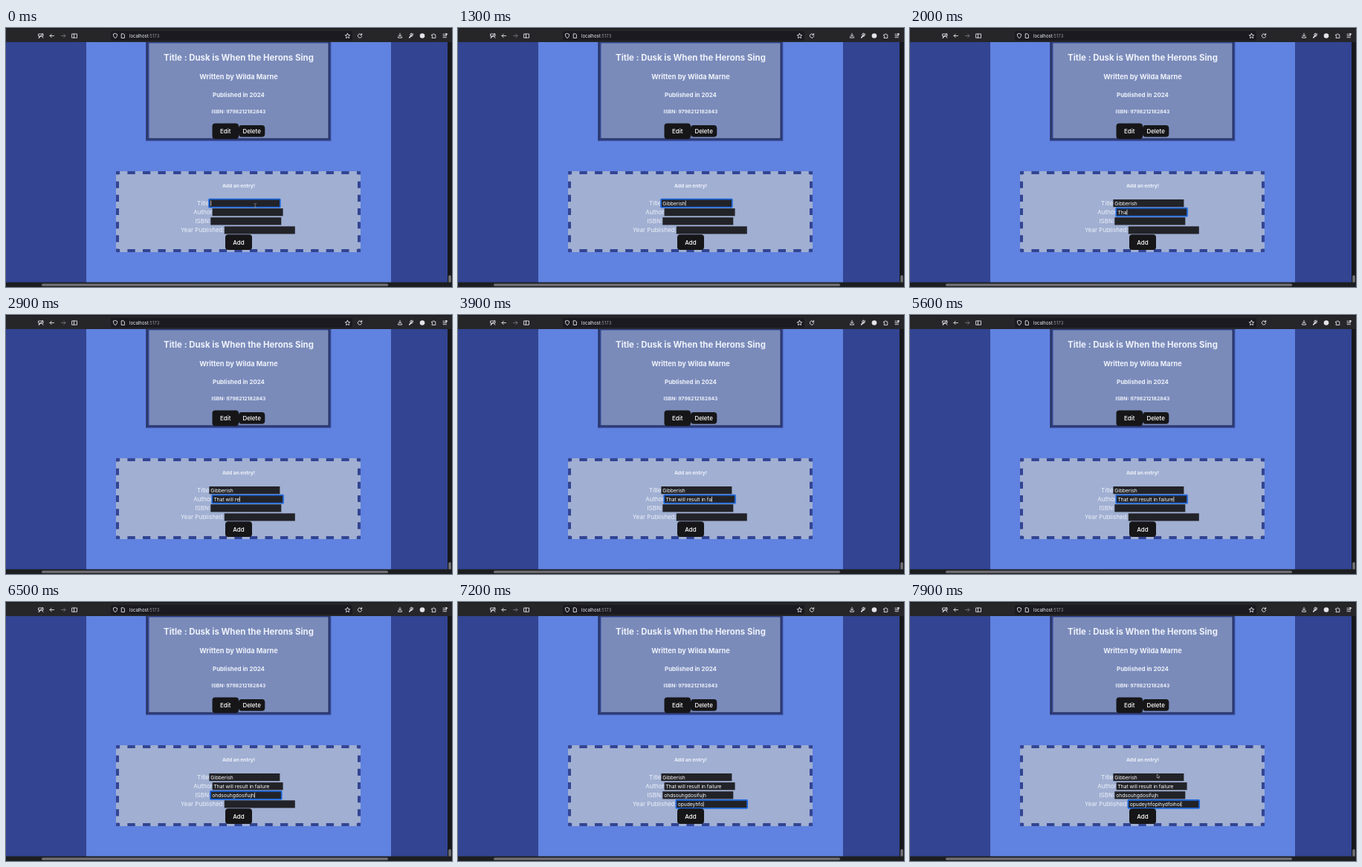
An HTML page for the animation above (8000 ms loop, 600 by 349 pixels).

```html
<!DOCTYPE html>
<html lang="en">
<head>
<meta charset="utf-8">
<title>Add an entry</title>
<style>
html, body { margin: 0; width: 100%; height: 100%; overflow: hidden; background: #16181b; }
svg { display: block; width: 100vw; height: 100vh; }
text { font-family: Inter, Roboto, "Open Sans", sans-serif; fill: #eef1fa; white-space: pre; }
.mid { text-anchor: middle; }
.head { font-weight: 700; }
.label { font-size: 8px; text-anchor: end; }
.btn { font-size: 8px; font-weight: 500; fill: #fff; }
.value { font-size: 6.7px; fill: #fff; }
.icon { fill: none; stroke: #e4e4e8; stroke-width: .9; stroke-linecap: round; stroke-linejoin: round; }
.solid { fill: #e4e4e8; }
</style>
</head>
<body>
<svg id="stage" viewBox="0 0 600 349">
  <rect width="600" height="349" fill="#324492"/>
  <rect x="108" y="19" width="410" height="325" fill="#6082e0"/>

  <!-- book card with a grooved border -->
  <path d="M188.500 17V152.300H437.300V17z" fill="#34468f"/>
  <path d="M188.500 17V152.300L190.500 150.300V17z" fill="#25305f"/>
  <path d="M192.500 148.500L190.500 150.300H435.300V17H433.500V148.500z" fill="#25305f"/>
  <rect x="192.5" y="20.5" width="241" height="128" fill="#7a8bba"/>
  <g class="mid head">
    <text x="313" y="44" font-size="11.45">Title : Dusk is When the Herons Sing</text>
    <text x="313" y="69.4" font-size="9.2">Written by Wilda Marne</text>
    <text x="313" y="92.8" font-size="7.95">Published in 2024</text>
    <text x="313" y="114.6" font-size="6.75">ISBN: 9798212182843</text>
  </g>

  <!-- entry form -->
  <rect x="148" y="193" width="329" height="109" fill="#a0afd2"/>
  <g id="dashes" stroke="#324492" stroke-width="4" fill="none"></g>
  <text class="mid head" x="313" y="215.4" font-size="6.7">Add an entry!</text>
  <g id="fields"></g>
  <g id="buttons"></g>

  <!-- browser toolbar -->
  <rect width="600" height="19" fill="#262629"/>
  <rect width="600" height="1" fill="#19191c"/>
  <rect x="141" y="4" width="325" height="13" rx="2" fill="#1b1a20"/>
  <g class="icon">
    <path d="M44 8h6v3h-6zM45.500 11l-1.500 2.500M48 11l2 2.500M44.500 13.500l5-6"/>
    <path d="M64.500 10.500h-5.500m2.300-2.300l-2.300 2.300 2.300 2.300"/>
    <path d="M74.500 10.500h5.500m-2.300-2.300l2.300 2.300-2.300 2.300" stroke="#77777d"/>
    <path d="M89 8h6.500v5.200h-6.500zM91.500 8v5.200"/>
    <path d="M147 7.500l2.600 1c0 2.800-.8 4.200-2.600 5.200-1.800-1-2.600-2.400-2.600-5.200z"/>
    <path d="M155.600 7.800h2.600l1.200 1.200v4.500h-3.800z"/>
    <path d="M459.500 7.300l1 2.100 2.200.3-1.600 1.600.4 2.300-2-1.100-2 1.100.4-2.300-1.600-1.600 2.200-.3z"/>
    <path d="M478.300 9a2.700 2.700 0 1 0 .4 2.200M478.700 7.500v2h-2"/>
    <path d="M530 7.300v4m-1.800-1.700l1.800 1.700 1.800-1.700M527.500 11.700v1.500h5v-1.500"/>
    <path d="M542.700 12.900l3-3" stroke-width="1.500"/>
    <path d="M547.300 8.100l-1.200 1.200-1-.9 1-1.200a2 2 0 1 0 1.200.9z"/>
    <path d="M573 9h1.300a1.100 1.100 0 1 1 2.200 0h1.300v4.500h-4.800v-1.200a1 1 0 1 0 0-2z"/>
    <path d="M588 8.300h2M588 10.500h4.500M588 12.700h4.500"/>
  </g>
  <circle class="solid" cx="592.3" cy="8.300" r="1.400"/>
  <circle class="solid" cx="560" cy="10.500" r="3.300"/>
  <text x="166" y="12.700" font-size="6">localhost<tspan fill="#96969c">:5173</tspan></text>

  <!-- scrollbars -->
  <rect x="594" y="19" width="6" height="330" fill="#16181b"/>
  <rect x="595.300" y="333" width="3.500" height="14.500" rx="1.750" fill="#727276"/>
  <rect y="342.600" width="600" height="6.400" fill="#1d1e21"/>
  <rect x="48" y="344.600" width="466" height="3.200" rx="1.600" fill="#727276"/>

  <g id="beam" fill="none" stroke="#8a8c92" stroke-width=".8">
    <path d="M333.500 236.500q1.500 0 1.700 1q.2-1 1.700-1M335.200 237.500v4M333.500 242.400q1.500 0 1.700-1q.2 1 1.700 1"/>
  </g>
  <path id="arrow" d="M332.300 232v5l1.200-1 .8 1.700 .9-.4-.8-1.600h1.500z" fill="#08080a" stroke="#fff" stroke-width=".5"/>
</svg>
<script>
const LOOP = 8000;
const $ = id => document.getElementById(id);

function add(parent, tag, attrs, content = "") {
  const el = document.createElementNS("http://www.w3.org/2000/svg", tag);
  for (const key in attrs) el.setAttribute(key, attrs[key]);
  el.textContent = content;
  parent.appendChild(el);
  return el;
}

// Dashes and gaps are equal; a side begins and ends with half a dash.
function dashedSide(path, length) {
  const dash = length / Math.ceil(length / 21) / 2;
  add($("dashes"), "path", {
    d: path, "stroke-dasharray": dash, "stroke-dashoffset": dash / 2
  });
}
dashedSide("M148 195H477", 329);
dashedSide("M148 300H477", 329);
dashedSide("M150 193V302", 109);
dashedSide("M475 193V302", 109);

function button(x, y, w, h, label) {
  add($("buttons"), "rect", { x, y, width: w, height: h, rx: 4, fill: "#161618" });
  add($("buttons"), "text", { class: "btn mid", x: x + w / 2, y: y + h / 2 + 2.9 }, label);
}
button(277.5, 128.5, 35.5, 21, "Edit");
button(313, 131, 35.3, 15.7, "Delete");
button(295, 278.3, 36, 20.8, "Add");

// Typing is one key per `gap` ms from `start`; `first` is an early opening key.
const fields = [
  { label: "Title", x: 273.4, focus: 0, first: 300, start: 600, gap: 100, text: "Gibberish" },
  { label: "Author", x: 277.6, focus: 1500, start: 1800, gap: 100, text: "That will result in failure" },
  { label: "ISBN:", x: 275.3, focus: 5700, start: 5800, gap: 45, text: "ohdsouhgdosifujh" },
  { label: "Year Published:", x: 293.8, focus: 6700, start: 6800, gap: 45, text: "opudeyhfopihydfoihoi" }
];

fields.forEach((f, i) => {
  const y = 231 + 12.1 * i, g = $("fields");
  add(g, "text", { class: "label", x: f.x, y: y + 7.5 }, f.label);
  add(g, "rect", { x: f.x, y, width: 95, height: 10.2, fill: "#222328" });
  f.ring = add(g, "rect", {
    x: f.x - .4, y: y - .4, width: 95.8, height: 11, rx: .8,
    fill: "none", stroke: "#1b66dc", "stroke-width": 1.7
  });
  f.value = add(g, "text", { class: "value", x: f.x + 1.9, y: y + 7.5 });
  f.caret = add(g, "rect", { y: y + 1.6, width: .7, height: 7, fill: "#fff" });
});

function typed(f, t) {
  const later = t < f.start ? 0 : Math.floor((t - f.start) / f.gap) + 1;
  return f.text.slice(0, later + (f.first !== undefined && t >= f.first ? 1 : 0));
}

function show(el, on) {
  el.setAttribute("visibility", on ? "visible" : "hidden");
}

function render(t) {
  fields.forEach((f, i) => {
    const next = fields[i + 1];
    const active = t >= f.focus && (!next || t < next.focus);
    const text = typed(f, t);
    if (f.value.textContent !== text) f.value.textContent = text;
    show(f.ring, active);
    show(f.caret, active);
    if (active) {
      const width = text ? f.value.getComputedTextLength() : 0;
      f.caret.setAttribute("x", f.x + 2 + width);
    }
  });
  show($("beam"), t < 300);
  show($("arrow"), t >= 7800);
}

const origin = performance.now();
function tick() {
  const t = (performance.now() - origin) % LOOP;
  render(Math.floor(t / 100) * 100);
  requestAnimationFrame(tick);
}
tick();
</script>
</body>
</html>
```
